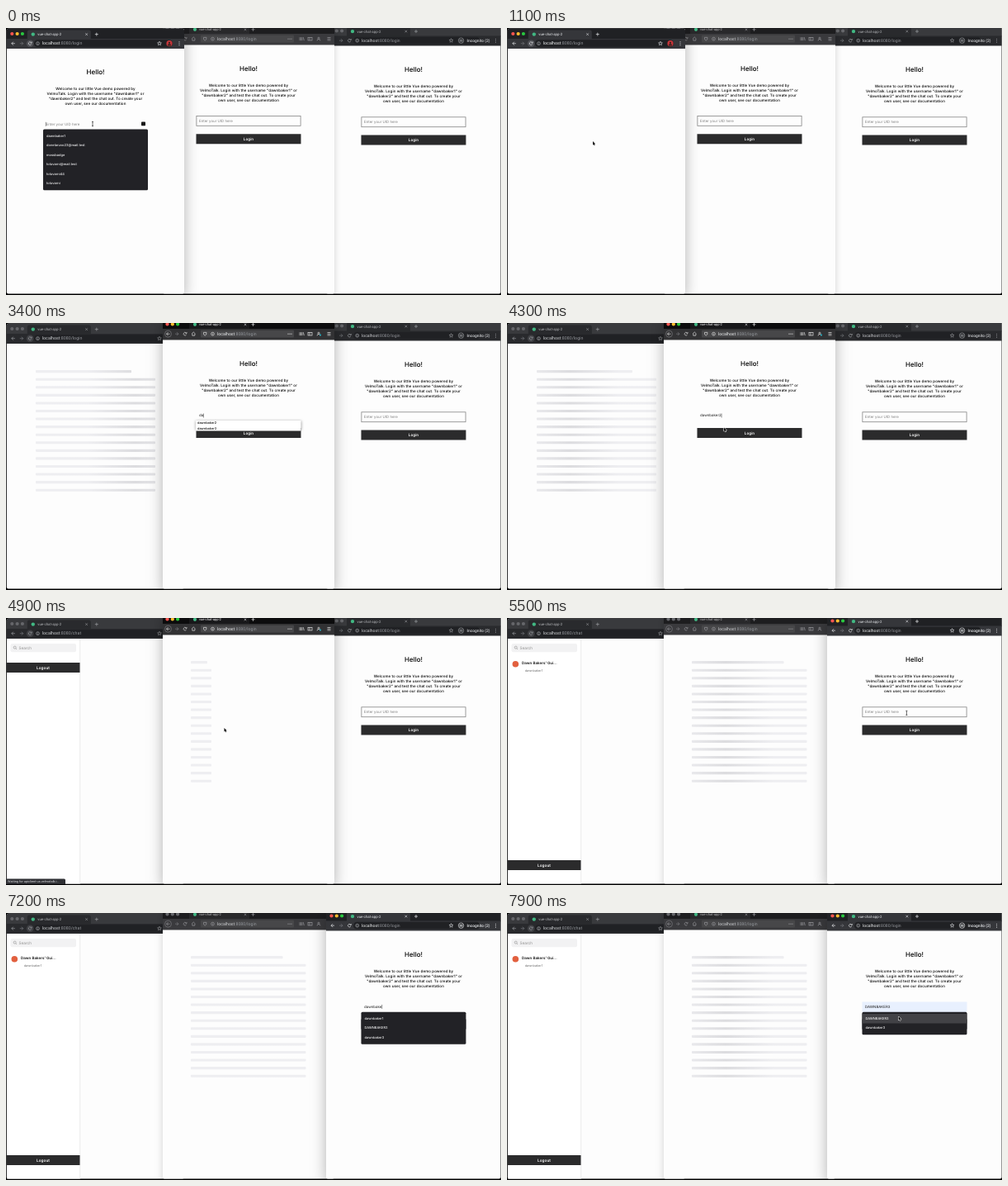
Recreate the animation shown at these times as an HTML page with a canvas. Size 600 px wide and 323 px high, loop 8000 ms.

```html
<!DOCTYPE html>
<html lang="en">
<head>
<meta charset="utf-8">
<title>Chat login demo</title>
<style>
html, body { margin: 0; width: 100%; height: 100%; overflow: hidden; background: #000; }
canvas { display: block; width: 600px; height: 323px; }
</style>
</head>
<body>
<canvas id="stage"></canvas>
<script>
const LOOP = 8000, BOTTOM = 321.6;
const canvas = document.getElementById('stage');
const ratio = window.devicePixelRatio || 1;
canvas.width = 600 * ratio;
canvas.height = 323 * ratio;
const ctx = canvas.getContext('2d');
ctx.scale(ratio, ratio);
ctx.textBaseline = 'middle';
ctx.textRendering = 'geometricPrecision';

const HOLDS = [[2400, 2700], [3400, 3700], [6000, 6200], [7000, 7200], [7300, 7600]];
const UI = 'Roboto, sans-serif', PAGE = 'Inter, sans-serif';
const BUTTON = '#2b2b2c', LOGO = '#41b883';
const INTRO = ['Welcome to our little Vue demo powered by',
  'VelmoTalk. Login with the username "dawnbaker1" or',
  '"dawnbaker2" and test the chat out. To create your',
  'own user, see our documentation'];
const SAVED = ['dawnbaker1', 'donelaruvo23@mail.test', 'mossbadge',
  'toluvarni@mail.test', 'toluvarni44', 'toluvarni'];
const POINTER = [[0, 105, 116], [100, 105, 116], [300, 105, 131], [500, 105, 131],
  [700, 104.5, 138], [1300, 104.5, 138], [1800, 263, 115], [2000, 263.5, 113],
  [3600, 263.5, 113], [3700, 262, 121], [4100, 262, 121], [4500, 265, 134],
  [5000, 265, 134], [5400, 485, 115], [5900, 479, 114], [6200, 478.5, 121],
  [7600, 476, 134], [7900, 475, 126]];

function rect(x, y, w, h, color, radius = 0) {
  ctx.fillStyle = color;
  ctx.beginPath();
  ctx.roundRect(x, y, w, h, radius);
  ctx.fill();
}

function dot(x, y, r, color) {
  ctx.fillStyle = color;
  ctx.beginPath();
  ctx.arc(x, y, r, 0, 7);
  ctx.fill();
}

function ring(x, y, r, color, from = 0, to = 7) {
  ctx.strokeStyle = color;
  ctx.lineWidth = 0.7;
  ctx.beginPath();
  ctx.arc(x, y, r, from, to);
  ctx.stroke();
}

function line(color, width, ...points) {
  ctx.strokeStyle = color;
  ctx.lineWidth = width;
  ctx.beginPath();
  points.forEach(([x, y]) => ctx.lineTo(x, y));
  ctx.stroke();
}

function text(str, x, y, size, color, { weight = 400, align = 'left', font = PAGE, gap = 0 } = {}) {
  ctx.font = `${weight} ${size}px ${font}`;
  ctx.letterSpacing = gap + 'px';
  ctx.textAlign = align;
  ctx.fillStyle = color;
  ctx.fillText(str, x, y);
}

function arrow(x, y, dir, color) {
  line(color, 0.7, [x - 2 * dir, y], [x + 2 * dir, y]);
  line(color, 0.7, [x, y - 2], [x + 2 * dir, y], [x, y + 2]);
}

function reload(x, y, color) {
  ring(x, y, 1.8, color, 0.5, 5.6);
  line(color, 0.7, [x + 2, y - 2.2], [x + 2, y - 0.6], [x + 0.5, y - 0.6]);
}

function info(x, y, color) {
  ring(x, y, 1.9, color);
  line(color, 0.6, [x, y - 0.3], [x, y + 1.1]);
  dot(x, y - 1, 0.3, color);
}

function star(x, y, color) {
  const points = Array.from({ length: 11 }, (_, i) => {
    const r = i % 2 ? 1.1 : 2.5, angle = i * Math.PI / 5;
    return [x + r * Math.sin(angle), y - r * Math.cos(angle)];
  });
  line(color, 0.6, ...points);
}

function cross(x, y, r, color) {
  line(color, 0.6, [x - r, y - r], [x + r, y + r]);
  line(color, 0.6, [x + r, y - r], [x - r, y + r]);
}

function plus(x, y, color) {
  line(color, 0.7, [x - 2, y], [x + 2, y]);
  line(color, 0.7, [x, y - 2], [x, y + 2]);
}

function lights(x, y, focused) {
  const colors = focused ? ['#fb5650', '#fcbc2e', '#29c840'] : Array(3).fill('#66676b');
  colors.forEach((color, i) => dot(x + i * 6.3, y, 2.1, color));
}

function frame(x, y, w, focused) {
  ctx.save();
  ctx.shadowColor = `rgba(0,0,0,${focused ? 0.3 : 0.18})`;
  ctx.shadowBlur = (focused ? 17 : 8) * ratio;
  ctx.shadowOffsetY = 5 * ratio;
  rect(x, y, w, BOTTOM - y, '#fdfdfd', 2);
  ctx.restore();
}

function address(path, x, y, size, focused) {
  const style = { font: UI };
  text('localhost', x, y, size, focused ? '#f1f3f4' : '#d0d2d5', style);
  text(':8080/' + path, x + ctx.measureText('localhost').width, y, size, '#92959a', style);
}

function chromeWindow(x, top, w, focused, path, incognito) {
  const strip = focused ? '#202124' : '#393a3d', bar = focused ? '#35363a' : '#292a2d';
  const icon = focused ? '#e4e6e9' : '#9a9ca0', y = top + 18.7, right = x + w;
  frame(x, top + 0.7, w, focused);
  rect(x, top + 0.7, w, 13, strip, [2, 2, 0, 0]);
  rect(x + 25, top + 2.5, 77, 12, bar, [2.5, 2.5, 0, 0]);
  rect(x, top + 13, w, 12, bar);
  lights(x + 6.5, top + 7, focused);
  dot(x + 32, top + 7.6, 2.2, LOGO);
  text('vue-chat-app-2', x + 37.5, top + 7.8, 4.4, focused ? '#e8eaed' : '#b4b6b9', { font: UI });
  cross(x + 96.8, top + 7.6, 1.3, icon);
  plus(x + 109, top + 7.6, icon);
  rect(x + 33, top + 14.3, w - (incognito ? 58 : 47), 8.8, '#202124', 4.4);
  arrow(x + 8, y, -1, icon);
  arrow(x + 18, y, 1, '#75777b');
  if (!incognito) dot(x + 28.3, y, 4.3, focused ? '#505156' : '#404145');
  reload(x + 28.3, y, icon);
  info(x + 37.7, y, '#a4a7ab');
  address(path, x + 43, y, incognito ? 5.1 : 5.3, focused);
  star(right - (incognito ? 60 : 30), y, icon);
  if (incognito) {
    ring(right - 48, y, 3.2, icon);
    rect(right - 49.9, y - 1.2, 3.8, 0.8, icon);
    dot(right - 49, y + 0.9, 0.8, icon);
    dot(right - 47, y + 0.9, 0.8, icon);
    text('Incognito (2)', right - 41, y, 4.9, focused ? '#e8eaed' : '#d0d2d5', { font: UI, weight: 500 });
  } else {
    dot(right - 18, y, 3.6, focused ? '#c5363b' : '#87393c');
    dot(right - 18, y - 0.8, 1.1, '#34221f');
    rect(right - 20, y + 0.6, 4, 2.2, '#34221f', [1.5, 1.5, 0.5, 0.5]);
  }
  [-2, 0, 2].forEach(d => dot(right - 6, y + d, 0.55, icon));
}

function foxWindow(focused) {
  const x = 190, w = 208, y = 13.2, icon = focused ? '#dededf' : '#96969a';
  const bar = focused ? '#323234' : '#3a3a3d';
  frame(x, -6, w, focused);
  rect(x, -6, w, 14, focused ? '#0c0c0d' : '#1d1d1f');
  rect(x + 32, -6, 73, 14, focused ? '#18181a' : '#29292b');
  rect(x, 7, w, 13.5, bar);
  lights(x + 5.5, 1.5, focused);
  dot(x + 39, 1.8, 2.1, LOGO);
  text('vue-chat-app-2', x + 44, 2, 4.1, focused ? '#f5f5f6' : '#b5b5b8', { font: UI });
  cross(x + 100, 1.8, 1.3, icon);
  plus(x + 109.5, 1.8, icon);
  ring(x + 6.5, y, 4, '#77777b');
  arrow(x + 6.5, y, -1, icon);
  arrow(x + 17, y, 1, '#77777b');
  reload(x + 27, y, icon);
  line(icon, 0.7, [x + 35, y], [x + 37.3, y - 2.2], [x + 39.6, y]);
  line(icon, 0.7, [x + 35.8, y], [x + 35.8, y + 2], [x + 38.8, y + 2], [x + 38.8, y]);
  rect(x + 46, 8.8, 113, 8.8, '#474749', 1);
  line(icon, 0.7, [x + 49.5, y - 1.8], [x + 53, y - 1.8], [x + 52.7, y + 0.8],
    [x + 51.2, y + 2], [x + 49.7, y + 0.8], [x + 49.5, y - 1.8]);
  info(x + 60.5, y, icon);
  address('login', x + 66, y, 5.2, focused);
  [-2, 0, 2].forEach(d => dot(x + 154 + d, y, 0.6, icon));
  [0, 1.5, 3].forEach(d => line(icon, 0.7, [x + 166 + d, y - 2], [x + 166 + d, y + 2]));
  line(icon, 0.7, [x + 170.3, y - 2], [x + 171.3, y + 2]);
  ctx.strokeRect(x + 176, y - 1.8, 5, 3.6);
  line(icon, 0.7, [x + 178, y - 1.8], [x + 178, y + 1.8]);
  ring(x + 189, y - 0.9, 1.1, icon);
  ring(x + 189, y + 2.2, 1.9, icon, Math.PI, 2 * Math.PI);
  if (focused) dot(x + 191, y + 1.3, 1, '#19b4c8');
  [-1.7, 0, 1.7].forEach(d => line(icon, 0.7, [x + 199.5, y + d], [x + 203.5, y + d]));
}

function loginPage(cx, dy, { value = '', active, preview, items, hot = -1, light } = {}) {
  const left = cx - 63.5, top = 106 + dy;
  // The focused field loses its border, which lifts what follows
  const lift = active ? 1.2 : 0, middle = top + 6.6 - lift / 2;
  text('Hello!', cx, 49.2 + dy, 8, '#000', { align: 'center', weight: 500 });
  INTRO.forEach((row, i) =>
    text(row, cx, 69.2 + dy + i * 6.1, 4.5, '#000', { align: 'center', weight: 500, gap: 0.07 }));
  rect(left, 128.2 + dy - lift, 127, 12, BUTTON);
  text('Login', cx, 134.4 + dy - lift, 4.6, '#fff', { align: 'center', weight: 600 });
  if (preview) rect(left, top, 127, 12.5, '#e8f0fe');
  else if (!active) {
    ctx.strokeStyle = '#858585';
    ctx.lineWidth = 0.8;
    ctx.strokeRect(left + 0.4, top + 0.4, 126.2, 11.9);
  }
  text(value || 'Enter your UID here', left + 3.5, middle, 4.4, value ? '#1a1a1a' : '#7c7c7c');
  if (active && !preview) {
    const caret = left + 3.3 + (value ? ctx.measureText(value).width + 0.5 : 0);
    line('#222', 0.5, [caret, middle - 2.5], [caret, middle + 2.5]);
  }
  if (!items) return;
  if (light) {
    ctx.save();
    ctx.shadowColor = 'rgba(0,0,0,.4)';
    ctx.shadowBlur = 3 * ratio;
    rect(left - 0.5, top + 12, 127.5, items.length * 6.2, '#fff');
    ctx.restore();
    items.forEach((item, i) => {
      if (i === hot) rect(left - 0.5, top + 12 + i * 6.2, 127.5, 6.2, '#d8e6f8');
      text(item, left + 1.5, top + 15.2 + i * 6.2, 3.9, '#111', { weight: 500 });
    });
  } else {
    rect(left, top + 12.3, 127, items.length * 11.5 + 4.6, '#222226', 1.5);
    items.forEach((item, i) => {
      const y = top + 20.3 + i * 11.5;
      if (i === hot) rect(left, y - 5.8, 127, 11.6, '#424246');
      text(item, left + 4, y, 4, '#f0f0f1', { weight: 500 });
    });
  }
}

function skeleton(x, y, w, age) {
  const span = 145, mid = x + span * (2.2 * (age / 1200 % 1) - 1);
  const shade = ctx.createLinearGradient(mid - 58, 0, mid + 58, 0);
  shade.addColorStop(0, '#eeeef1');
  shade.addColorStop(0.5, '#dcdcdf');
  shade.addColorStop(1, '#eeeef1');
  for (let i = 0; i < 16; i++) {
    rect(x, y - 1.5 + i * 9.57, i ? w : w * 0.8, 3.1, shade, 0.8);
  }
}

function chatPage(loaded) {
  rect(1, 25, 88.5, BOTTOM - 25, '#fff');
  line('#e2e2e2', 0.7, [89.7, 25], [89.7, BOTTOM]);
  rect(5.5, 31, 79.5, 10.3, '#f2f2f3', 2);
  ring(10.7, 35.6, 1.5, '#999');
  line('#999', 0.7, [11.8, 36.7], [13, 38]);
  text('Search', 15.5, 36.4, 4.7, '#909090');
  const y = loaded ? 293 : 54;
  rect(1, y, 88.5, 12, BUTTON);
  text('Logout', 45, y + 6.2, 4.7, '#fff', { align: 'center', weight: 600 });
  if (loaded) {
    dot(10.3, 55.7, 3.8, '#e2603f');
    text("Dawn Bakers' Gui...", 18, 55.1, 4.5, '#151515', { weight: 600 });
    text('dawnbaker1', 21.8, 64.2, 3.8, '#707070');
  } else {
    rect(0, 315.5, 72, 6.5, '#2f3034', [0, 1.5, 0, 0]);
    text('Waiting for apiclient-us.velmotalk.i...', 2, 318.9, 3.9, '#dcdde0', { font: UI });
  }
}

function leftWindow(t) {
  chromeWindow(0.8, 0, 215.2, t < 1900, t < 4600 ? 'login' : 'chat');
  if (t < 1000) {
    const open = t < 500, picked = t >= 300;
    loginPage(108.5, 4.3, { value: picked ? 'dawnbaker1' : '', active: open, preview: picked,
      items: open && SAVED, hot: t >= 200 ? 0 : -1 });
    if (open) rect(164, 113.6, 5, 4.6, '#161616', 0.8);
  } else if (t >= 4600) chatPage(t >= 5000);
  else if (t >= 1200) skeleton(36, 58.6, 145, t - 1200);
}

function middleWindow(t) {
  foxWindow(t >= 1900 && t < 5500);
  if (t >= 4800) skeleton(224, 53.6, t < 5000 ? 25 : 139.5, t - 4800);
  else if (t < 4700) {
    const picked = t >= 4100;
    const value = picked ? 'dawnbaker2' : 'da'.slice(0, t < 3000 ? 0 : t < 3300 ? 1 : 2);
    loginPage(294, 0, { value, active: t >= 2700, light: true, hot: t >= 3700 ? 0 : -1,
      items: t >= 3000 && !picked && ['dawnbaker2', 'dawnbaker3'] });
  }
}

function rightWindow(t) {
  chromeWindow(388, -3.5, 211.6, t >= 5500, 'login', true);
  const name = 'dawnbaker3', chosen = t >= 7800;
  const typed = t < 6400 ? 0 : t <= 7000 ? (t - 6300) / 100 : t < 7300 ? 8 : t < 7600 ? 9 : 10;
  const matches = [name.toUpperCase(), name];
  const items = !typed ? SAVED : typed < 10 ? [SAVED[0], ...matches] : matches;
  loginPage(494, 1.4, { value: chosen ? matches[0] : name.slice(0, typed), active: t >= 5900,
    preview: chosen, items: t >= 6200 && items, hot: chosen ? 0 : -1 });
}

function pointer(t) {
  if ((t >= 2800 && t < 3700) || (t >= 6400 && t < 7600)) return;
  const next = POINTER.findIndex(key => key[0] > t);
  const b = POINTER[next < 0 ? POINTER.length - 1 : next];
  const a = next < 0 ? b : POINTER[next - 1];
  const k = a === b ? 0 : (t - a[0]) / (b[0] - a[0]), ease = k * k * (3 - 2 * k);
  const x = a[1] + (b[1] - a[1]) * ease, y = a[2] + (b[2] - a[2]) * ease;
  if (t < 200 || (t >= 1800 && t < 2800) || (t >= 5400 && t < 6200)) {
    line('#222', 0.7, [x, y - 2.4], [x, y + 2.4]);
    line('#222', 0.7, [x - 1, y - 2.6], [x + 1, y - 2.6]);
    line('#222', 0.7, [x - 1, y + 2.6], [x + 1, y + 2.6]);
    return;
  }
  ctx.beginPath();
  [[0, 0], [0, 4.6], [1, 3.7], [1.8, 5.3], [2.6, 4.9], [1.9, 3.4], [3.2, 3.2]]
    .forEach(([dx, dy]) => ctx.lineTo(x - 0.5 + dx, y - 1 + dy));
  ctx.closePath();
  ctx.strokeStyle = '#fff';
  ctx.lineWidth = 1;
  ctx.stroke();
  ctx.fillStyle = '#111';
  ctx.fill();
}

function draw(now) {
  let t = Math.floor(now % LOOP / 100) * 100;
  const hold = HOLDS.find(([from, to]) => t >= from && t < to);
  if (hold) t = hold[0];
  rect(0, 0, 600, 323, '#000');
  const order = t < 1900 ? [rightWindow, middleWindow, leftWindow]
    : t < 5500 ? [rightWindow, leftWindow, middleWindow]
    : [leftWindow, middleWindow, rightWindow];
  order.forEach(paint => paint(t));
  pointer(t);
  requestAnimationFrame(draw);
}
requestAnimationFrame(draw);
</script>
</body>
</html>
```
